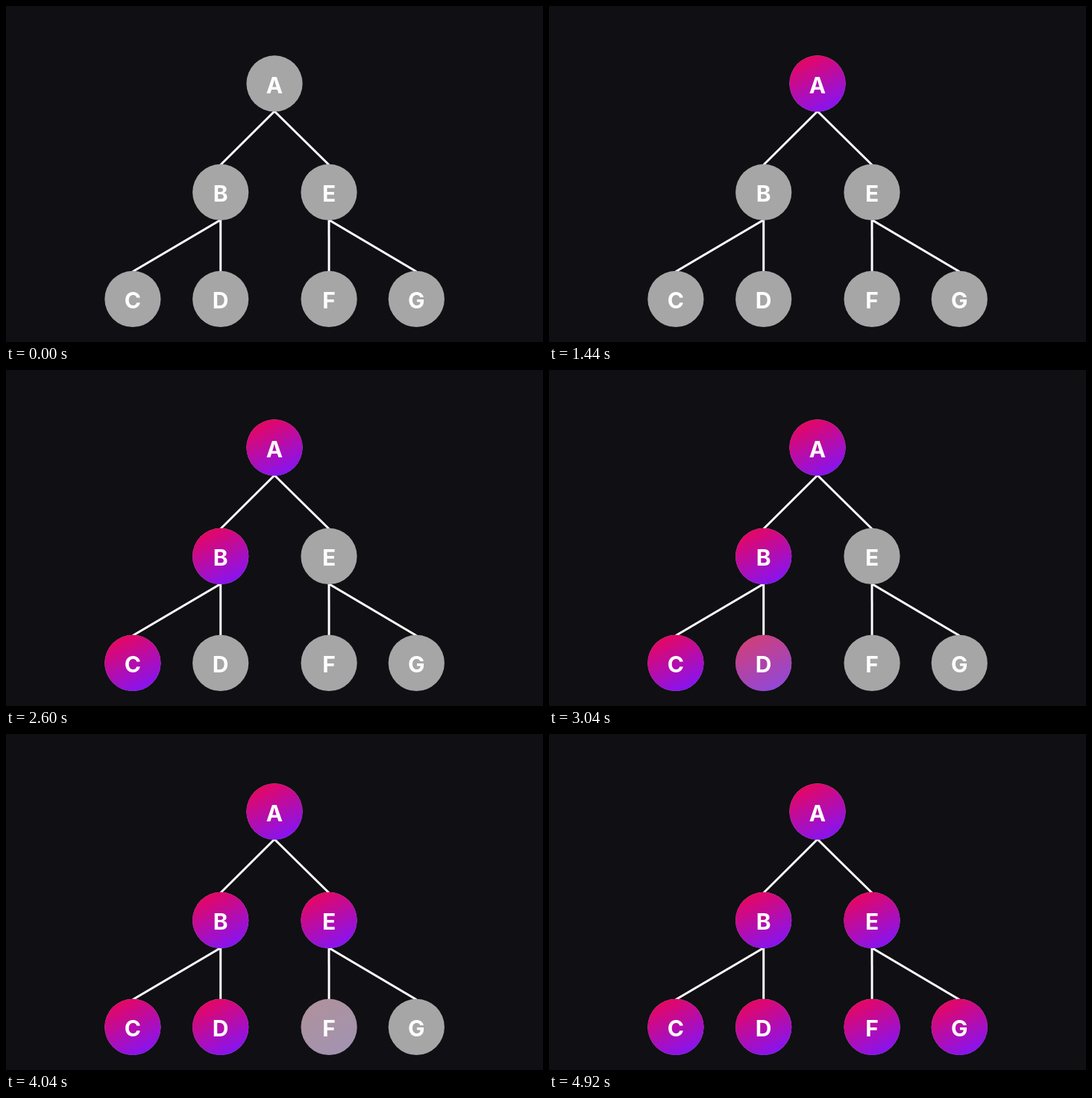
These frames come from a looping animation (720x450 px, 5.12 s). An HTML page with a canvas:

```html
<!DOCTYPE html>
<html lang="en">
<head>
<meta charset="utf-8">
<title>Depth-first traversal</title>
<style>
  html, body { margin: 0; width: 100%; height: 100%; overflow: hidden; background: #100f14; }
  canvas { display: block; width: 720px; height: 450px; }
</style>
</head>
<body>
<canvas id="stage" width="720" height="450"></canvas>
<script>
const ctx = document.getElementById('stage').getContext('2d');
const LOOP = 5120, STEP = 40;
const RADIUS = 37.6;
const FIRST_VISIT = 1100, VISIT_GAP = 580, FADE = 310;
const ARROW_IN = 340, ARROW_OUT = 1050, ARROW_EXIT = 300;

// Listed in visiting order; parent is an index into this list.
const nodes = [
  { label: 'A', x: 360, y: 103.9 },
  { label: 'B', x: 287.7, y: 249.4, parent: 0 },
  { label: 'C', x: 169.9, y: 392.4, parent: 1 },
  { label: 'D', x: 287.7, y: 392.4, parent: 1 },
  { label: 'E', x: 433, y: 249.4, parent: 0 },
  { label: 'F', x: 433.1, y: 392.4, parent: 4 },
  { label: 'G', x: 550.3, y: 392.4, parent: 4 }
];

const clamp = v => Math.min(1, Math.max(0, v));

// Underdamped spring from 0 to 1, peaking 180 ms after the start.
function spring(ms) {
  if (ms <= 0) return 0;
  const w = Math.PI / 180, decay = w / Math.sqrt(3);
  return 1 - Math.exp(-decay * ms) * (Math.cos(w * ms) + decay / w * Math.sin(w * ms));
}

function drawEdge(node) {
  const from = nodes[node.parent];
  ctx.beginPath();
  ctx.moveTo(from.x, from.y + RADIUS - 0.5);
  ctx.lineTo(node.x, node.y - RADIUS + 1);
  ctx.stroke();
}

function drawNode({ label, x, y }, visited) {
  ctx.beginPath();
  ctx.arc(x, y, RADIUS, 0, Math.PI * 2);
  ctx.fillStyle = '#a6a6a6';
  ctx.fill();
  if (visited > 0) {
    const fill = ctx.createLinearGradient(x - 17, y - 36, x + 17, y + 36);
    fill.addColorStop(0, '#e8065f');
    fill.addColorStop(1, '#8414f5');
    ctx.globalAlpha = visited;
    ctx.fillStyle = fill;
    ctx.fill();
    ctx.globalAlpha = 1;
  }
  ctx.fillStyle = '#fff';
  ctx.fillText(label, x, y + 12.9);
}

function drawArrow(t) {
  const exit = clamp((t - ARROW_OUT) / ARROW_EXIT);
  const scale = 1.02 * spring(t - ARROW_IN) * (1 - exit * exit);
  if (scale <= 0) return;
  ctx.save();
  ctx.translate(353.2, 41.7);
  ctx.scale(scale, scale);
  ctx.strokeStyle = '#e00562';
  ctx.lineWidth = 7.5;
  ctx.lineCap = ctx.lineJoin = 'round';
  ctx.beginPath();
  ctx.moveTo(-11.9, -17);
  ctx.lineTo(6.6, 17.1);
  ctx.moveTo(-11.7, 11.8);
  ctx.lineTo(6.6, 17.1);
  ctx.lineTo(11.8, -1.7);
  ctx.stroke();
  ctx.restore();
}

function draw(t) {
  ctx.fillStyle = '#100f14';
  ctx.fillRect(0, 0, 720, 450);
  ctx.strokeStyle = '#fff';
  ctx.lineWidth = 3;
  nodes.slice(1).forEach(drawEdge);
  ctx.font = '700 30px Inter, sans-serif';
  ctx.textAlign = 'center';
  nodes.forEach((node, i) =>
    drawNode(node, clamp((t - FIRST_VISIT - i * VISIT_GAP) / FADE)));
  drawArrow(t);
}

const start = performance.now();
function tick() {
  const t = (performance.now() - start) % LOOP;
  draw(Math.floor(t / STEP) * STEP);
  requestAnimationFrame(tick);
}
tick();
</script>
</body>
</html>
```
